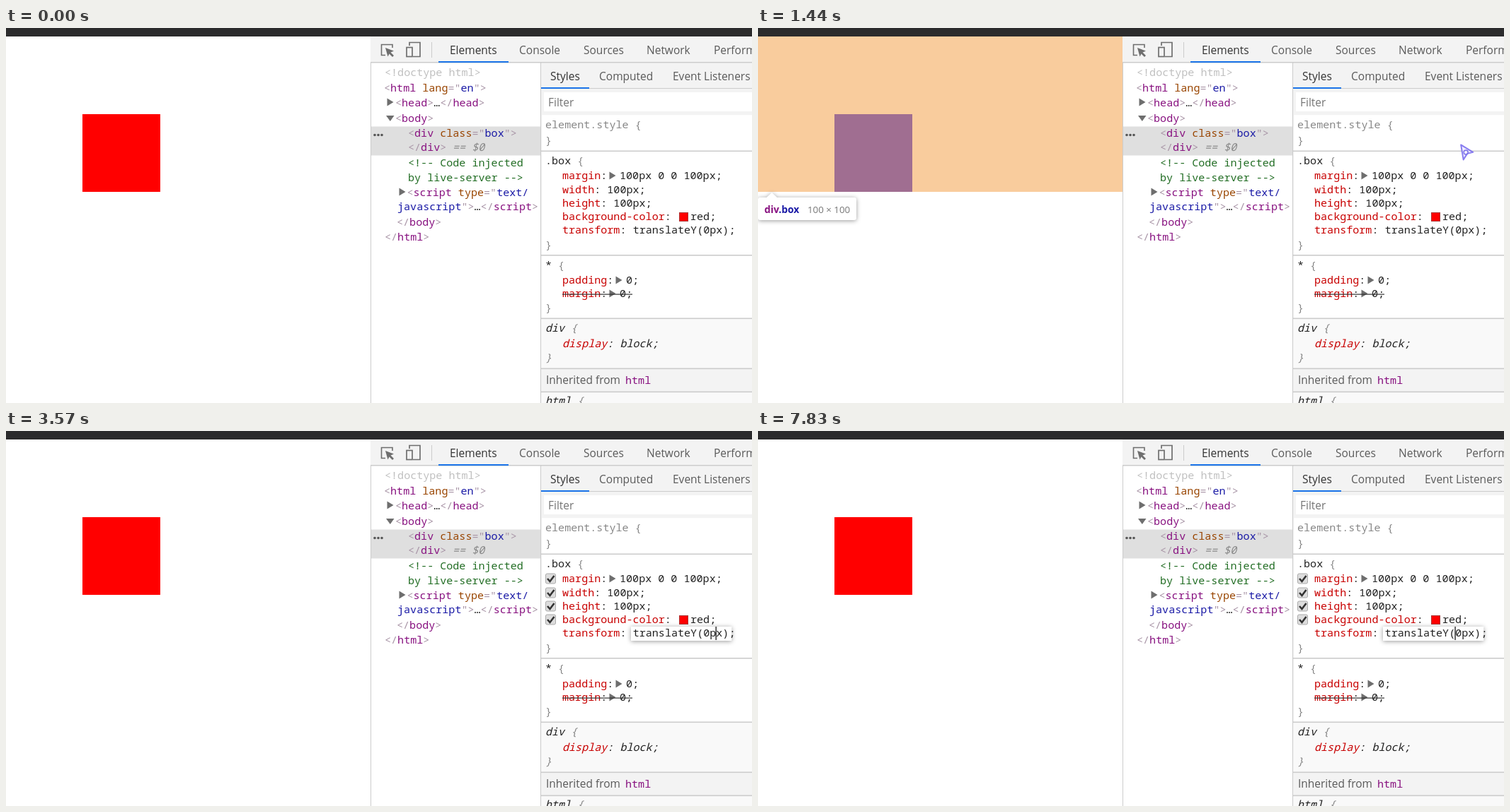
These frames come from a looping animation (1054 by 531 pixels, 8 s). An HTML page:

```html
<!DOCTYPE html>
<html lang="en">
<head>
<meta charset="utf-8">
<title>Moving a box with translateY</title>
<style>
  html, body { margin: 0; width: 100%; height: 100%; overflow: hidden; background: #fff; }
  svg { display: block; width: 1054px; height: 531px; }
  text { white-space: pre; }
  .code { font: 15.08px "Noto Sans Mono", monospace; }
  .ui { font: 15.5px "Open Sans", "Noto Sans", sans-serif; }
  .tip { font: 13.3px "Open Sans", "Noto Sans", sans-serif; fill: #777; }
  .tip .name { font-size: 13.8px; font-weight: 700; fill: #881280; }
  .shadow { filter: drop-shadow(0 1px 3px rgba(0, 0, 0, .4)); }
  .italic { font-style: italic; }
</style>
</head>
<body>
<svg id="stage" viewBox="0 0 1054 531" xmlns="http://www.w3.org/2000/svg"></svg>
<script>
const LOOP = 8000;
const CHAR = 9.05;
const VALUE_X = 885.7;
const PX = 1.1;

const inks = {
  p: '#a894a6',  // punctuation
  t: '#881280',  // tag
  a: '#994500',  // attribute
  v: '#1a1aa6',  // attribute value
  c: '#236e25',  // comment
  g: '#888',
  l: '#c0c0c0',
  r: '#c80000',  // property
  k: '#222'
};

const escapeText = s => s.replace(/&/g, '&amp;').replace(/</g, '&lt;').replace(/>/g, '&gt;');
const rect = (x, y, w, h, fill, more = '') =>
  `<rect x="${x}" y="${y}" width="${w}" height="${h}" fill="${fill}" ${more}/>`;
const path = (d, fill, more = '') => `<path d="${d}" fill="${fill}" ${more}/>`;
const ui = (x, y, s, fill = '#5a5a5a') =>
  `<text class="ui" x="${x}" y="${y}" fill="${fill}">${s}</text>`;
const right = (x, y) => path(`M${x} ${y - 5.5}l9 5.5l-9 5.5z`, '#6e6e6e');

// Runs are split by "~"; the first letter of each run picks its ink.
function code(x, mid, runs, style = '') {
  const spans = runs.split('~').map(run =>
    `<tspan fill="${inks[run[0]]}">${escapeText(run.slice(1))}</tspan>`);
  return `<text class="code ${style}" x="${x}" y="${mid + 5}">${spans.join('')}</text>`;
}

function checkbox(y) {
  return rect(762.5, y - 7, 14, 14, '#ddd', 'rx="2" stroke="#aaa"') +
    path(`M765 ${y}l3.5 4l6 -8`, 'none', 'stroke="#333" stroke-width="2.6"');
}

function tooltip(id, y, w, arrow, name, size, sizeX) {
  return `<g id="${id}"><g class="shadow">${rect(0, y, w, 32, '#fff', 'rx="3"')}${path(arrow, '#fff')}</g>` +
    `<text class="tip" y="${y + 21.5}"><tspan class="name" x="9">${name}</tspan>` +
    `<tspan x="${sizeX}">${size}</tspan></text></g>`;
}

const page = `
  ${rect(0, 0, 1054, 531, '#fff')}
  ${rect(108, 122, 110, 110, '#f00', 'id="box"')}
  <g id="bodyHover">
    ${rect(0, 122, 515, 110, 'rgba(111,168,220,.66)')}
    ${tooltip('bodyTip', 82, 135, 'M11 113h17l-8.5 9z', 'body', '470.4 × 100', 54)}
  </g>
  <g id="divHover">
    ${path('M0 12H515V232H218V122H108V232H0z', 'rgba(246,178,107,.66)')}
    ${rect(108, 122, 110, 110, 'rgba(111,168,220,.66)')}
    ${tooltip('divTip', 240, 139, 'M11 241h17l-8.5 -8z',
      'div<tspan fill="#1a1aa6">.box</tspan>', '100 × 100', 70)}
  </g>`;

const toolbar = `
  ${rect(0, 0, 1054, 12, '#2b2b2c')}
  ${rect(515, 12, 539, 37, '#f3f3f3')}
  ${rect(515, 48, 539, 1.5, '#ccc')}
  ${rect(611, 47, 99, 2, '#1a73e8')}
  ${path('M546 28V23.5H530.5V38.5H536', 'none', 'stroke="#6e6e6e" stroke-width="1.6"')}
  ${path('M536 28l12 4.5l-4.5 2l4.5 4.5l-2 2l-4.500 -4.500l-2 4z', '#6e6e6e')}
  ${path('M570 25V20.500H585V40.500H575', 'none', 'stroke="#6e6e6e" stroke-width="1.7"')}
  ${rect(566, 27.5, 8, 13, '#f3f3f3', 'stroke="#6e6e6e" stroke-width="1.7"')}
  ${rect(601, 20, 1, 22, '#ccc')}
  ${ui(627, 37, 'Elements', '#333')}${ui(725, 37, 'Console')}${ui(816, 37, 'Sources')}
  ${ui(905, 37, 'Network')}${ui(1000, 37, 'Performance')}`;

const elements = `
  ${rect(516, 49.500, 239, 482, '#fff')}
  ${rect(516, 139.5, 239, 41, '#dfdfdf')}
  <g id="rowHover">
    ${rect(520, 119, 231, 19.500, '#e4ecf9', 'rx="6"')}
    ${rect(542, 181, 1, 105, '#ddd')}
  </g>
  ${code(535, 63, 'l<!doctype html>')}
  ${code(534, 85, 'p<~thtml~a lang~p="~ven~p">')}
  ${right(538.5, 105)}${code(550, 106, 'p<~thead~p>~k…~p</~thead~p>')}
  ${path('M537 124h11.500l-5.700 8z', '#6e6e6e')}${code(550, 128, 'p<~tbody~p>')}
  ${[521, 526, 531].map(x => `<circle cx="${x}" cy="151.500" r="1.800" fill="#555"/>`).join('')}
  ${code(568, 149, 'p<~tdiv~a class~p="~vbox~p">')}
  ${code(568, 169, 'p</~tdiv~p>')}${code(622, 169, 'g == $0', 'italic')}
  ${code(568, 191, 'c<!-- Code injected')}
  ${code(568, 212, 'cby live-server -->')}
  ${right(555.5, 232)}${code(566.5, 233, 'p<~tscript~a type~p="~vtext/')}
  ${code(553, 253, 'vjavascript~p">~k…~p</~tscript~p>')}
  ${code(552, 275, 'p</~tbody~p>')}
  ${code(535, 296, 'p</~thtml~p>')}
  ${rect(515, 12, 1, 519, '#ccc')}${rect(755, 49, 1.5, 482, '#ccc')}`;

const divider = y => rect(756, y, 298, 1.6, '#ccc');

const styles = `
  ${rect(756, 49.5, 298, 74, '#f3f3f3')}
  ${rect(756, 85, 298, 1, '#ccc')}${rect(756, 84, 68, 2, '#1a73e8')}
  ${ui(769, 74, 'Styles', '#333')}${ui(838, 74, 'Computed')}${ui(942, 74, 'Event Listeners')}
  ${rect(760, 91, 294, 27, '#fff')}${ui(766, 110.500, 'Filter', '#757575')}
  ${rect(756.5, 123.5, 298, 408, '#fff')}
  ${code(762, 137, 'gelement.style {')}${code(762, 159, 'g}')}
  ${divider(173.5)}
  ${code(762, 188, 'k.box ~g{')}
  <g id="checks">${[209, 229, 248, 267].map(checkbox).join('')}</g>
  ${code(786, 209, 'rmargin~k:')}${right(852.500, 209)}${code(867, 209, 'k100px 0 0 100px;')}
  ${code(786, 229, 'rwidth~k: 100px;')}
  ${code(786, 248, 'rheight~k: 100px;')}
  ${code(786, 267, 'rbackground-color~k:')}
  ${rect(951.5, 261.5, 12, 12, '#f00', 'stroke="#a33"')}${code(967, 267, 'kred;')}
  ${code(786, 286, 'rtransform~k:')}
  ${code(762, 307, 'g}')}
  ${divider(321)}
  ${code(762, 336, 'k* ~g{')}
  <g id="lower">
    ${code(786, 357, 'rpadding~k:')}${right(861.500, 357)}${code(876, 357, 'k0;')}
    ${code(786, 376, 'rmargin~k:')}${right(852.500, 376)}${code(867, 376, 'k0;')}
    ${rect(786, 376.500, 99, 1.200, '#333')}
    ${code(762, 396, 'g}')}
    ${rect(756.5, 411, 298, 71, '#f9f9f9')}${divider(410.5)}
    ${code(762, 425, 'kdiv ~g{', 'italic')}
    ${code(786, 447, 'rdisplay~k: block;', 'italic')}
    ${code(762, 467, 'g}', 'italic')}
    ${rect(756.5, 482, 298, 33, '#f3f3f3')}${divider(481.500)}
    ${ui(763, 504, 'Inherited from')}${code(875, 499, 'thtml')}
    ${rect(756.5, 515, 298, 16, '#f9f9f9')}${divider(514.500)}
    ${code(762, 528, 'khtml ~g{', 'italic')}
  </g>
  ${rect(883, 277, 143, 20, '#fff', 'id="editor" class="shadow"')}
  ${rect(885.5, 278, 136, 18, '#b7d8f5', 'id="selection"')}
  <text class="code" id="value" x="${VALUE_X}" y="291" fill="#222"></text>
  ${rect(0, 277, 1.2, 19, '#000', 'id="caret"')}`;

const pointer = `
  <g id="arrow" opacity=".85">
    ${path('M0 0L17 10.500L9 12.500L3.500 21z', '#eeecff', 'stroke="#7467ee" stroke-width="2" stroke-linejoin="round"')}
    <circle cx="7" cy="10.500" r="3" fill="none" stroke="#6a5ce8" stroke-width="1.500"/>
  </g>
  <g id="beam">
    <circle r="4.500" fill="#7f7de8" opacity=".75"/>
    ${path('M-3 -3L0 0L3 -3M0 0V16', 'none', 'stroke="#456"')}
  </g>`;

const stage = document.getElementById('stage');
stage.innerHTML = page + elements + styles + toolbar + pointer;

const part = Object.fromEntries([...stage.querySelectorAll('[id]')].map(el => [el.id, el]));
const show = (el, on) => el.setAttribute('visibility', on ? 'visible' : 'hidden');
const within = (t, from, to) => t >= from && t < to;

// Pointer stops: time, x, y.
const route = [
  [190, 889, 390], [290, 884, 255], [360, 872, 160], [430, 758, 150], [500, 630, 141],
  [590, 638, 155], [680, 640, 158], [1370, 640, 158], [1440, 993, 165],
  [1620, 1020, 235], [1800, 1025, 295], [2000, 1018, 284], [2160, 1014, 279], [LOOP, 1014, 279]
];

function pointerAt(t) {
  const next = Math.max(1, route.findIndex(stop => stop[0] > t));
  const [t0, x0, y0] = route[next - 1];
  const [t1, x1, y1] = route[next];
  const k = Math.max(0, (t - t0) / (t1 - t0));
  return [x0 + (x1 - x0) * k, y0 + (y1 - y0) * k];
}

// Edits: time, amount typed in front of "0px", caret column.
const edits = [
  [2280, '', 14], [3570, '', 13], [3700, '', 12], [4540, '', 11],
  [4900, '1', 12], [6630, '', 11], [6760, '5', 12], [7780, '', 11]
];

// Box offsets: time, translateY in CSS pixels.
const offsets = [[0, 0], [4950, 10], [6630, 0], [6810, 50], [7830, 0]];

const latest = (list, t) => list.filter(item => item[0] <= t).pop();

function caretOn(t) {
  if (within(t, 4900, 6630)) return within(t, 4900, 5460) || within(t, 5970, 6480);
  if (within(t, 6760, 7780)) return t < 7270;
  return !within(t, 4210, 4540);
}

function draw(t) {
  part.box.setAttribute('y', 122 + latest(offsets, t)[1] * PX);

  const onBody = within(t, 450, 550);
  show(part.bodyHover, onBody);
  show(part.rowHover, onBody);
  show(part.divHover, within(t, 550, 1470));
  show(part.checks, t >= 1520);

  const edit = latest(edits, t);
  const [, digit, column] = edit || [0, '', 0];
  const value = `translateY(${digit}0px)`;
  part.value.textContent = value + ';';
  part.editor.setAttribute('width', value.length * CHAR + 6.5);
  part.caret.setAttribute('x', VALUE_X + column * CHAR - 0.8);
  part.lower.setAttribute('transform', `translate(0 ${edit ? 1 : 0})`);
  show(part.editor, edit);
  show(part.selection, within(t, 2280, 3000));
  show(part.caret, edit && caretOn(t));

  const place = `translate(${pointerAt(t).join(' ')})`;
  part.arrow.setAttribute('transform', place);
  part.beam.setAttribute('transform', place);
  show(part.arrow, within(t, 190, 2000));
  show(part.beam, within(t, 2000, 3570));
}

function tick() {
  draw(performance.now() % LOOP);
  requestAnimationFrame(tick);
}
tick();
</script>
</body>
</html>
```
